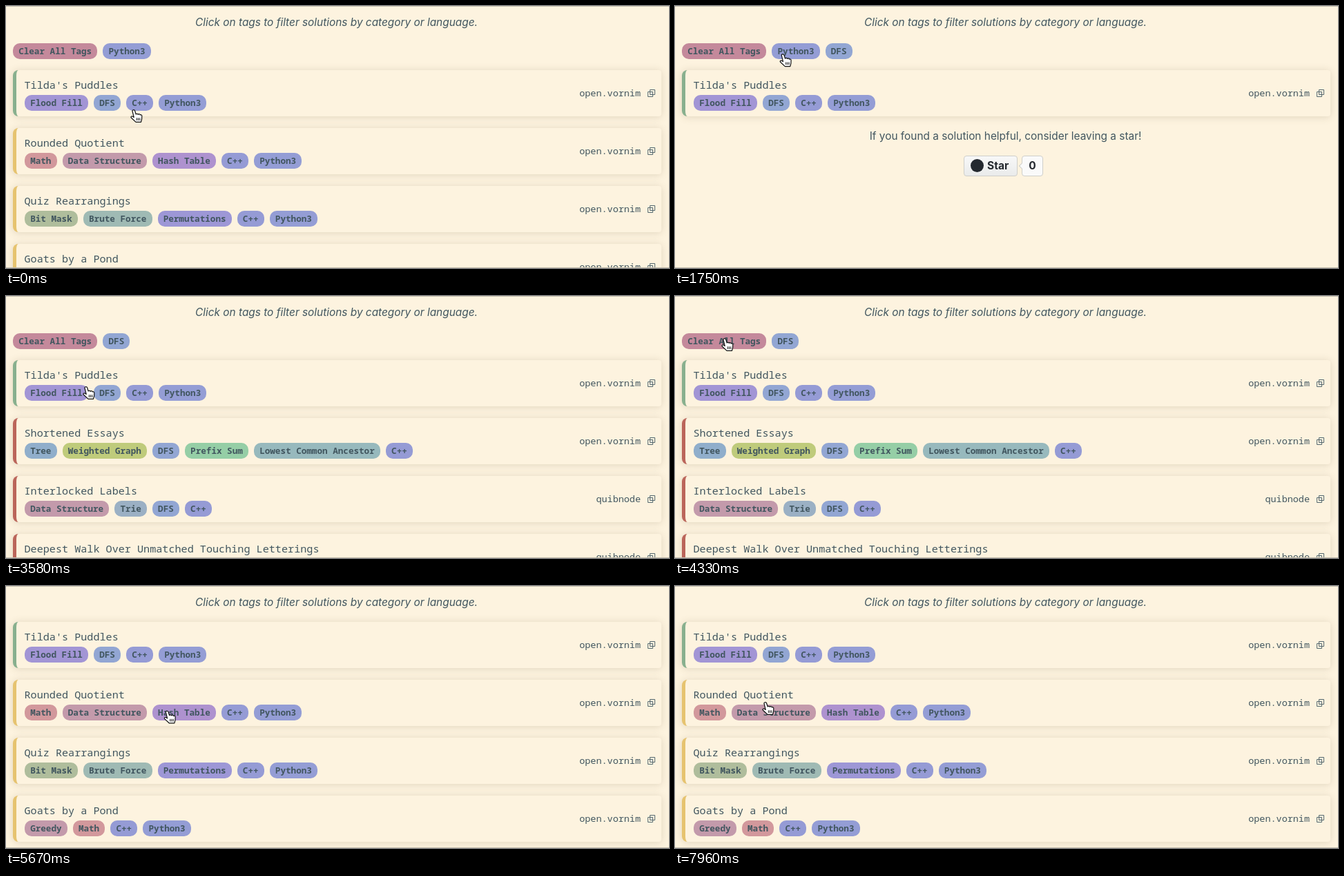
Animation, 960 px wide and 380 px high, one loop 8 s. Source, as an HTML page:

```html
<!DOCTYPE html>
<html lang="en">
<head>
<meta charset="utf-8">
<title>Filter solutions by tag</title>
<style>
html, body { margin: 0; width: 100%; height: 100%; overflow: hidden; background: #fdf3df; }
#stage { position: relative; width: 960px; height: 380px; overflow: hidden; background: #fdf3df; color: #41565f;
  font-family: "Noto Sans Mono", monospace; white-space: nowrap; }
#stage::after { content: ""; position: absolute; inset: 0; border: solid #c4bdae; border-width: 1px 0; }
.line { position: absolute; left: 0; width: 957px; text-align: center; font: 15.4px/24px Inter, sans-serif; }
.intro { top: 11.5px; font-style: italic; }
.tags { position: absolute; display: flex; gap: 8px; }
.filters { left: 10px; top: 54px; }
.tag { height: 23px; padding: 0 8.15px; border-radius: 10px; font-size: 12.63px; font-weight: 700; line-height: 23px; }
.card { position: absolute; left: 10px; width: 939px; height: 67px; box-sizing: border-box;
  border-left: 5px solid; border-radius: 8px 4px 4px 8px; background: #fdf3df;
  box-shadow: 0 1px 12px rgba(110, 95, 60, .2); }
.card .tags { left: 12px; top: 36px; }
.name, .site { position: absolute; line-height: 24px; color: #41565f; }
.name { left: 11.5px; top: 8.5px; font-size: 15.15px; }
.site { right: 30px; top: 21px; font-size: 13.46px; }
.card svg { position: absolute; right: 8px; top: 28px; fill: none; stroke: #55686f; }
.button, .count { position: absolute; top: 217px; height: 30px; box-sizing: border-box; border: 1px solid #cfcfca;
  border-radius: 4px; color: #24292f; font: 700 15.5px/28px Inter, sans-serif; }
.button { left: 418px; width: 78px; padding-left: 33px; background: linear-gradient(#f8f8f8, #eaebeb); }
.button::before { content: ""; position: absolute; left: 9px; top: 4px; width: 19px; height: 19px;
  border-radius: 50%; background: #24292f; }
.count { left: 502px; width: 31px; text-align: center; background: #fafafa; }
.count::before { content: ""; position: absolute; left: -4px; top: 11px; width: 5px; height: 5px;
  border: solid #cfcfca; border-width: 0 0 1px 1px; background: #fafafa; transform: rotate(45deg); }
#cursor { position: absolute; left: -.7px; top: -.7px; z-index: 1; overflow: visible; }
</style>
</head>
<body>
<div id="stage">
  <div class="line intro">Click on tags to filter solutions by category or language.</div>
  <svg id="cursor" width="1" height="1">
    <path fill="#fff" stroke="#111" stroke-width="1.2" stroke-linejoin="round"
      d="M-2 1.5C-2.5-.5 1-1 1.6 1L3.2 6C4 5 6 5 6.3 6.3C7.3 5.3 9 5.6 9.2 7C10.3 6.3 12 7 11.8 8.8L11.6 13L10.5 17.4H3L-3.5 11.3C-5 9.8-3 8.2-1.5 9.3L.2 10.4Z"/>
    <path fill="none" stroke="#111" d="M4.4 11.3v3.7M6.6 11.3v3.7M8.8 11.3v3.7"/>
  </svg>
</div>
<script>
const LOOP = 8000;
const GREEN = '#88b08e', YELLOW = '#e6c36f', RED = '#bb655a';
const OPEN = 'open.vornim', QUIB = 'quibnode';
const tagColors = {
  'Clear All Tags': '#c4899b', 'Python3': '#949dd5', 'DFS': '#92a6d3', 'C++': '#959bd5',
  'Flood Fill': '#a295d5', 'Math': '#d2989c', 'Data Structure': '#c39aab', 'Hash Table': '#ae92cf',
  'Bit Mask': '#afbd9c', 'Brute Force': '#9fbab4', 'Permutations': '#9d97d6', 'Greedy': '#c39aab',
  'Tree': '#90aecb', 'Weighted Graph': '#bfcb7b', 'Prefix Sum': '#95cea6',
  'Lowest Common Ancestor': '#97b9bd', 'Trie': '#9bb0c4'
};

// Each problem: name, site, difficulty colour, tags
const puddles = ["Tilda's Puddles", OPEN, GREEN, ['Flood Fill', 'DFS', 'C++', 'Python3']];
const pythonProblems = [
  puddles,
  ['Rounded Quotient', OPEN, YELLOW, ['Math', 'Data Structure', 'Hash Table', 'C++', 'Python3']],
  ['Quiz Rearrangings', OPEN, YELLOW, ['Bit Mask', 'Brute Force', 'Permutations', 'C++', 'Python3']],
  ['Goats by a Pond', OPEN, YELLOW, ['Greedy', 'Math', 'C++', 'Python3']]
];
const dfsProblems = [
  puddles,
  ['Shortened Essays', OPEN, RED, ['Tree', 'Weighted Graph', 'DFS', 'Prefix Sum', 'Lowest Common Ancestor', 'C++']],
  ['Interlocked Labels', QUIB, RED, ['Data Structure', 'Trie', 'DFS', 'C++']],
  ['Deepest Walk Over Unmatched Touching Letterings', QUIB, RED, ['Tree', 'DFS', 'C++']]
];
const views = [
  { start: 0, filters: ['Python3'], problems: pythonProblems },
  { start: 600, filters: ['Python3', 'DFS'], problems: [puddles] },
  { start: 2150, filters: ['DFS'], problems: dfsProblems },
  { start: 4550, filters: [], problems: pythonProblems }
];

// Fingertip positions: time, x, y
const path = [
  [0, 186, 152], [420, 145, 144], [1150, 145, 144], [1850, 158, 67], [2600, 158, 67],
  [3580, 117, 133], [4250, 73, 63], [4900, 73, 63], [5700, 235, 183], [6540, 324, 269],
  [7250, 250, 240], [7960, 132, 170], [LOOP, 132, 170]
];

const tagRow = (tags, extra = '') => `<div class="tags ${extra}">` +
  tags.map(t => `<span class="tag" style="background:${tagColors[t]}">${t}</span>`).join('') + '</div>';

const card = ([name, site, color, tags], top) =>
  `<div class="card" style="top:${top}px;border-left-color:${color}">
    <div class="name">${name}</div>${tagRow(tags)}<div class="site">${site}</div>
    <svg width="12" height="12"><path d="M.5 3.5h7v7h-7zM3.5.5h7v7h-7z"/></svg>
  </div>`;

const footer = `<div class="line" style="top:177px">If you found a solution helpful, consider leaving a star!</div>
  <div class="button">Star</div><div class="count">0</div>`;

const stage = document.getElementById('stage');
const cursor = document.getElementById('cursor');
for (const view of views) {
  const { filters, problems } = view;
  const top = filters.length ? 93 : 52;
  view.element = document.createElement('div');
  view.element.innerHTML =
    (filters.length ? tagRow(['Clear All Tags', ...filters], 'filters') : '') +
    problems.map((p, i) => card(p, top + 84 * i)).join('') +
    (problems.length === 1 ? footer : '');
  stage.append(view.element);
}

const ease = u => u * u * (3 - 2 * u);

function draw(now) {
  const t = now % LOOP;
  const current = views.findLast(v => t >= v.start);
  for (const v of views) v.element.style.display = v === current ? '' : 'none';

  const next = path.findIndex(p => p[0] > t);
  const [t0, x0, y0] = path[next - 1], [t1, x1, y1] = path[next];
  const k = ease((t - t0) / (t1 - t0));
  cursor.style.transform = `translate(${x0 + (x1 - x0) * k}px, ${y0 + (y1 - y0) * k}px)`;
}

const begin = performance.now();
function tick() {
  draw(performance.now() - begin);
  requestAnimationFrame(tick);
}
tick();
</script>
</body>
</html>
```
